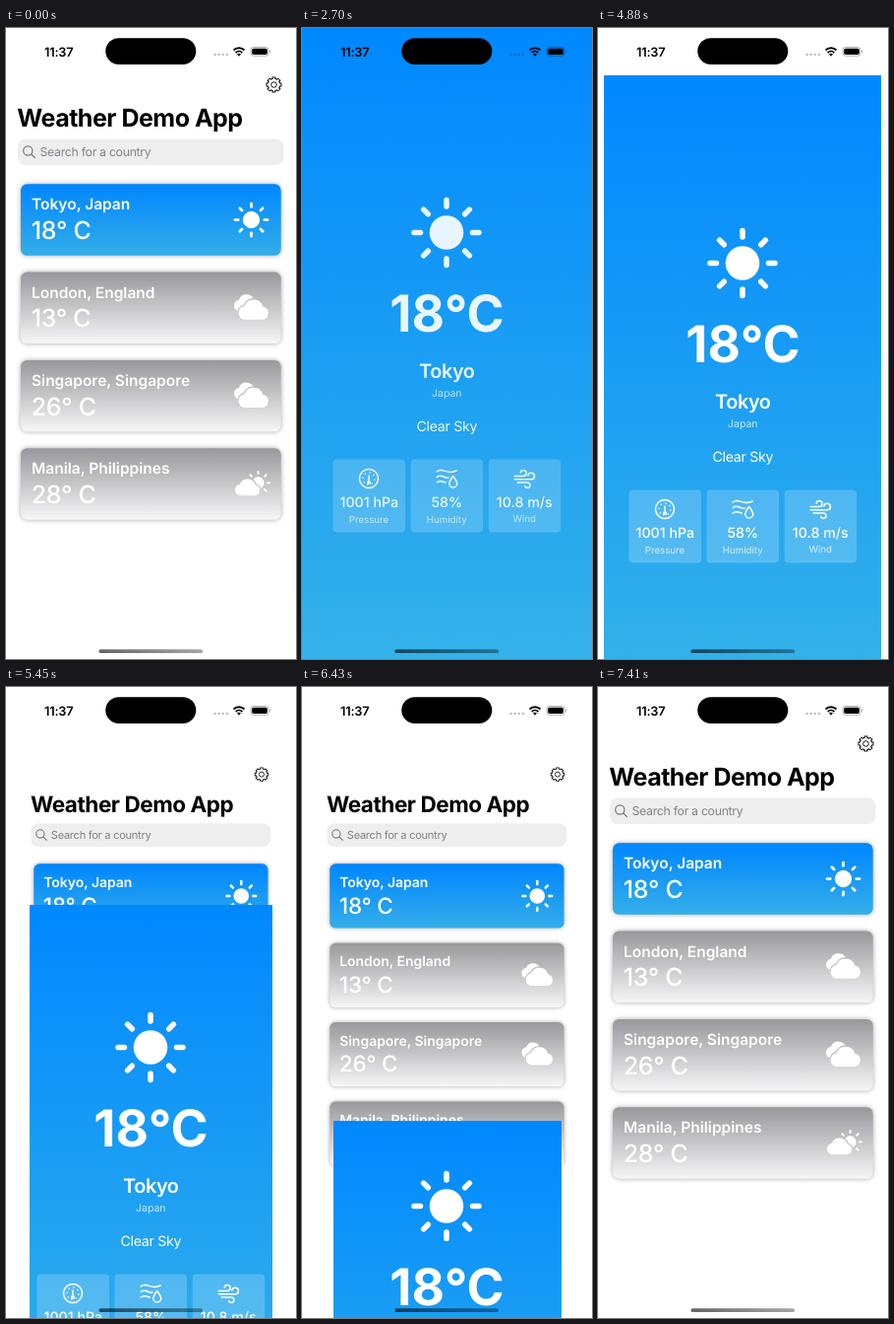
Write an HTML page that moves like this. It is 295 by 640 pixels and loops after 9440 ms.

```html
<!DOCTYPE html>
<html lang="en">
<head>
<meta charset="utf-8">
<title>Weather demo</title>
<style>
  html, body { margin: 0; width: 100%; height: 100%; overflow: hidden; background: #fff; }
  #stage { position: relative; width: 295px; height: 640px; overflow: hidden; isolation: isolate; }
  svg { display: block; overflow: visible; }
  #stage > svg { position: absolute; left: 0; top: 0; }
  text { font-family: Inter, "Liberation Sans", sans-serif; text-rendering: geometricPrecision; }
  .list, .detail, .panel { animation: 9440ms linear infinite; }

  .list { z-index: 1; transform-origin: 147.5px 0; animation-name: list; }
  .title { font-size: 25px; font-weight: 700; letter-spacing: -.5px; }
  .hint { font-size: 12.3px; letter-spacing: -.3px; fill: #838388; }
  .card { filter: drop-shadow(0 0 2.5px rgba(0, 0, 0, .35)); }
  .city { font-size: 15.5px; font-weight: 600; fill: #fff; }
  .temp { font-size: 25px; font-weight: 500; letter-spacing: -.3px; fill: #fff; }

  .detail { position: absolute; inset: 0; z-index: 2; opacity: 0; animation-name: detail; }
  .panel {
    position: absolute; left: 0; right: 0; top: 0; height: 640px; overflow: hidden;
    background: linear-gradient(#0088ff, #34b2e9); animation-name: panel;
  }
  .content {
    position: absolute; left: calc(50% - 147.5px); top: calc(50% - 320px);
    fill: #fff; text-anchor: middle; animation: content 9440ms linear infinite;
  }
  .big { font-size: 51.5px; font-weight: 700; }
  .place { font-size: 19.9px; font-weight: 600; letter-spacing: -.4px; }
  .land { font-size: 10.5px; opacity: .75; }
  .sky { font-size: 14.2px; letter-spacing: -.3px; }
  .value { font-size: 14.2px; font-weight: 500; }
  .label { font-size: 9.7px; opacity: .75; }
  .line { fill: none; stroke: #fff; stroke-width: 1.5; stroke-linecap: round; stroke-linejoin: round; }

  .status { z-index: 3; }
  .clock { font-size: 12.8px; font-weight: 600; letter-spacing: -.2px; }

  @keyframes list {
    0%, 26.48% { transform: none; }
    27.54% { transform: translateY(20px) scale(.945); }
    29.2%, 68.33% { transform: translateY(36.9px) scale(.9); }
    69.49% { transform: translateY(25px) scale(.936); }
    70.66% { transform: translateY(12.6px) scale(.9735); }
    71.93% { transform: translateY(5.3px) scale(.99); }
    73.09% { transform: translateY(1.2px) scale(.9964); }
    75.2%, 100% { transform: none; }
  }
  /* On release the detail view drops behind the list and fades out. */
  @keyframes detail {
    0%, 26.48% { opacity: 0; z-index: 2; }
    27.54% { opacity: .6; }
    28.6% { opacity: 1; }
    68.32% { opacity: 1; z-index: 2; }
    68.33% { opacity: 1; z-index: 0; }
    70.66% { opacity: .12; }
    70.97%, 100% { opacity: 0; z-index: 0; }
  }
  @keyframes panel {
    0%, 51.6% { top: 0; height: 640px; left: 0; right: 0; }
    51.69% { top: 48px; height: 606px; left: 6px; right: 6.5px; }
    60.2% { left: 31.5px; right: 31.5px; }
    63.56% { top: 388px; height: 426px; }
    67.27%, 68.32% { top: 440px; height: 398px; left: 31.5px; right: 31.5px; }
    68.33%, 100% { top: 0; height: 640px; left: 0; right: 0; }
  }
  @keyframes content {
    0%, 26.48% { opacity: .6; }
    28.6% { opacity: .91; }
    34.4%, 100% { opacity: 1; }
  }
</style>
</head>
<body>
<div id="stage">
  <svg class="list" width="295" height="640">
    <defs>
      <linearGradient id="blue" x2="0" y2="1">
        <stop stop-color="#0086ff"/><stop offset="1" stop-color="#34aee8"/>
      </linearGradient>
      <linearGradient id="grey" x2="0" y2="1">
        <stop stop-color="#98989c"/><stop offset="1" stop-color="#f6f6f7"/>
      </linearGradient>
      <rect id="card" class="card" x="15" y="158.3" width="264.7" height="72.5" rx="6.5"/>
      <path id="ray" d="M0-26.5V-33" stroke="#fff" stroke-width="5.5" stroke-linecap="round"/>
      <g id="rays">
        <use href="#ray"/>
        <use href="#ray" transform="rotate(90)"/>
        <use href="#ray" transform="rotate(180)"/>
        <use href="#ray" transform="rotate(270)"/>
      </g>
      <g id="sun" fill="#fff">
        <circle r="17.3"/>
        <use href="#rays"/>
        <use href="#rays" transform="rotate(45)"/>
      </g>
      <path id="cloud" d="M7 21a7 7 0 0 1-.5-13.9A10 10 0 0 1 25.5 8a6.6 6.6 0 0 1-.5 13z"/>
      <mask id="behind" maskUnits="userSpaceOnUse" x="-10" y="-10" width="60" height="50">
        <path d="M-10-10h60v50h-60z" fill="#fff"/>
        <use href="#cloud" x="4.5" y="5" stroke="#000" stroke-width="2.8"/>
      </mask>
      <g id="clouds" fill="#fff">
        <g mask="url(#behind)"><use href="#cloud" transform="scale(.83)"/></g>
        <use href="#cloud" x="4.5" y="5"/>
      </g>
      <mask id="half" maskUnits="userSpaceOnUse" x="-10" y="-10" width="60" height="50">
        <path d="M-10-10h60v50h-60z" fill="#fff"/>
        <use href="#cloud" transform="translate(0 7.5) scale(.83)" stroke="#000" stroke-width="3.4"/>
      </mask>
      <g id="cloudsun" fill="#fff">
        <g mask="url(#half)"><use href="#sun" transform="translate(24 12) scale(.35)"/></g>
        <use href="#cloud" transform="translate(0 7.5) scale(.83)"/>
      </g>
      <path id="teeth" d="M0-8V8M-8 0H8M-5.7-5.7 5.7 5.7M-5.7 5.7 5.7-5.7"/>
    </defs>

    <path d="M0 41.6h295V611H0z" fill="#fff"/>
    <g transform="translate(272.5 57.5)">
      <g fill="#111" stroke="#111">
        <use href="#teeth" stroke-width="4"/><circle r="6.3"/>
      </g>
      <g fill="#fff" stroke="#fff">
        <use href="#teeth" stroke-width="2" transform="scale(.88)"/><circle r="5.3"/>
      </g>
      <circle r="2.8" fill="none" stroke="#111"/>
    </g>
    <text class="title" x="11.3" y="100">Weather Demo App</text>
    <rect x="12" y="112.5" width="270.5" height="26.5" rx="7.5" fill="#eeeeef"/>
    <g fill="none" stroke="#77777c" stroke-width="1.2" stroke-linecap="round">
      <circle cx="22.3" cy="124.5" r="4.6"/><path d="m25.8 128 3.6 3.6"/>
    </g>
    <text class="hint" x="34.5" y="130">Search for a country</text>

    <g>
      <use href="#card" fill="url(#blue)"/>
      <text class="city" x="26" y="184.4">Tokyo, Japan</text>
      <text class="temp" x="25.7" y="214">18° C</text>
      <use href="#sun" transform="translate(249.5 194.5) scale(.5)"/>
    </g>
    <g transform="translate(0 89.3)">
      <use href="#card" fill="url(#grey)"/>
      <text class="city" x="26" y="184.4">London, England</text>
      <text class="temp" x="25.7" y="214">13° C</text>
      <use href="#clouds" x="231.5" y="180.5"/>
    </g>
    <g transform="translate(0 178.6)">
      <use href="#card" fill="url(#grey)"/>
      <text class="city" x="26" y="184.4">Singapore, Singapore</text>
      <text class="temp" x="25.7" y="214">26° C</text>
      <use href="#clouds" x="231.5" y="180.5"/>
    </g>
    <g transform="translate(0 267.9)">
      <use href="#card" fill="url(#grey)"/>
      <text class="city" x="26" y="184.4">Manila, Philippines</text>
      <text class="temp" x="25.7" y="214">28° C</text>
      <use href="#cloudsun" x="232.5" y="181.5"/>
    </g>
  </svg>

  <div class="detail">
    <div class="panel">
      <svg class="content" width="295" height="640">
        <use href="#sun" x="147" y="207.5"/>
        <text class="big" x="147.5" y="308">18°C</text>
        <text class="place" x="147.3" y="355">Tokyo</text>
        <text class="land" x="147.3" y="374">Japan</text>
        <text class="sky" x="147.3" y="409">Clear Sky</text>
        <g fill-opacity=".2">
          <rect x="31.5" y="437.5" width="73.5" height="74" rx="4"/>
          <rect x="110.5" y="437.5" width="73.5" height="74" rx="4"/>
          <rect x="189.7" y="437.5" width="73.5" height="74" rx="4"/>
        </g>
        <g transform="translate(68 457)">
          <circle class="line" r="9.5"/>
          <circle class="line" r="6" stroke-dasharray=".1 4.6" transform="rotate(140)"/>
          <path class="line" d="M0-3V3"/><circle cy="4" r="2"/>
          <text class="value" x=".3" y="29.3">1001 hPa</text>
          <text class="label" y="44.5">Pressure</text>
        </g>
        <g transform="translate(147.2 457)">
          <path class="line" d="M-10-7c6-5 10 4 20-1M-10-1.5c5-4 8 2 12 .5M-10 4c4-3 6-.5 9 0"/>
          <path class="line" d="M6.500-2.500c2 3 4 5 4 7.500a4 4 0 0 1-8 0c0-2.500 2-4.500 4-7.500z"/>
          <text class="value" y="29.3">58%</text>
          <text class="label" y="44.5">Humidity</text>
        </g>
        <g transform="translate(226.2 457)">
          <path class="line" d="M-10-2.500H-1a3 3 0 1 0-3-3.500M-10 .8H7a3.300 3.300 0 1 0-3.300-3.800M-7 4H3a2.700 2.700 0 1 1-2.600 3.400"/>
          <text class="value" y="28.8">10.8 m/s</text>
          <text class="label" y="44">Wind</text>
        </g>
      </svg>
    </div>
  </div>

  <svg class="status" width="295" height="640">
    <defs>
      <linearGradient id="bar">
        <stop stop-opacity=".6"/><stop offset="1" stop-opacity=".35"/>
      </linearGradient>
    </defs>
    <text class="clock" x="39" y="28.5">11:37</text>
    <rect x="101.3" y="10.2" width="92" height="26.8" rx="13.4"/>
    <path d="M212.5 27h14" stroke="#000" stroke-opacity=".25" stroke-width="2.4" stroke-linecap="round" stroke-dasharray=".1 4"/>
    <path d="M231.5 22.5a7.800 7.800 0 0 1 11 0M233.700 25a4.700 4.700 0 0 1 6.600 0" fill="none" stroke="#000" stroke-width="1.8"/>
    <path d="M237 28.700l-2-2.100a2.900 2.900 0 0 1 4 0z"/>
    <rect x="249" y="19.5" width="18" height="8.7" rx="2.7" fill="none" stroke="#000" stroke-opacity=".4" stroke-width=".8"/>
    <rect x="250.2" y="20.7" width="15.6" height="6.3" rx="1.7"/>
    <path d="M268.200 22.400v2.900q1-.4 1-1.450t-1-1.450z" fill-opacity=".4"/>
    <rect x="94.5" y="630.3" width="105.5" height="3.7" rx="1.85" fill="url(#bar)"/>
  </svg>
</div>
</body>
</html>
```
